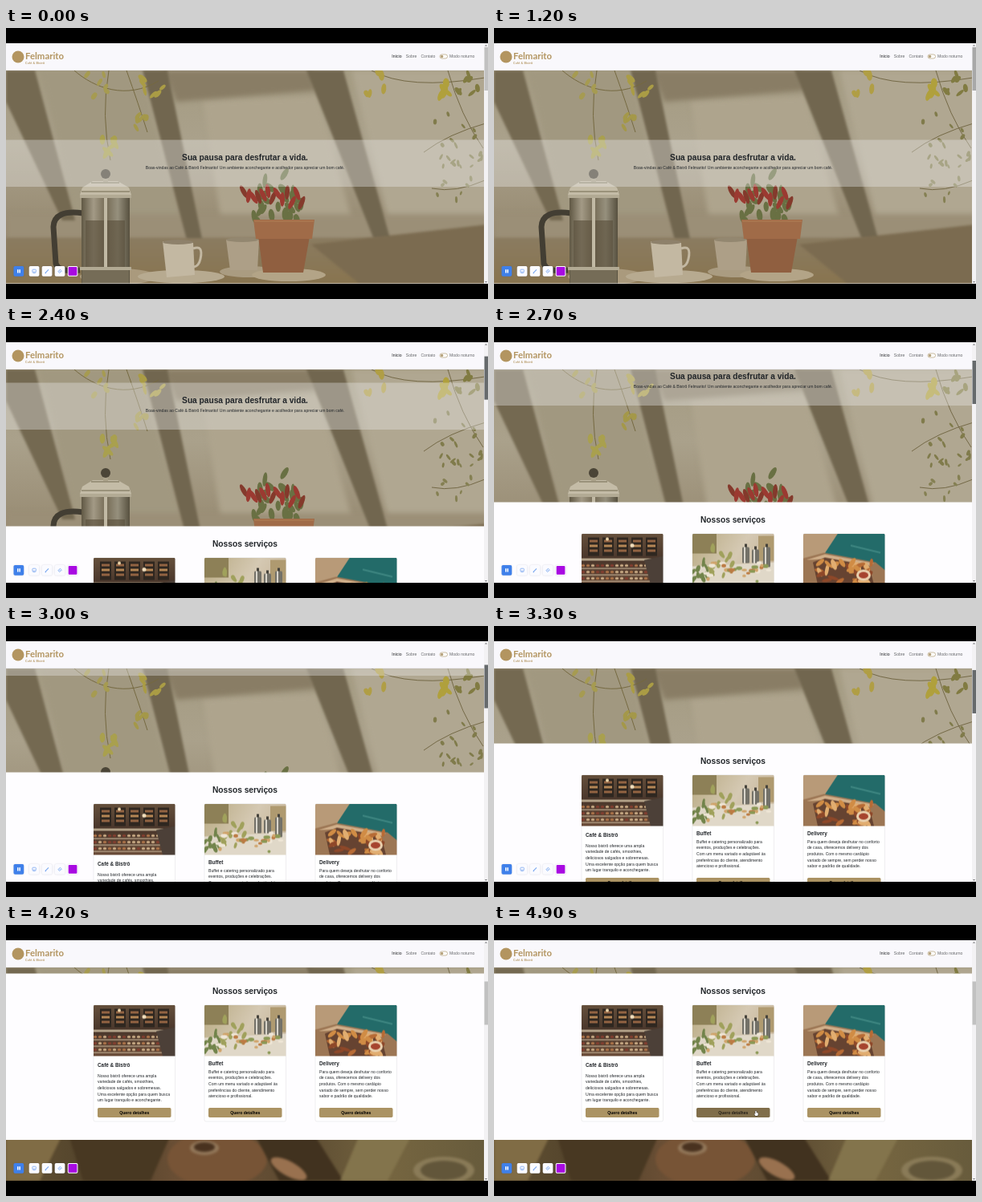
These frames come from a looping animation (600x338 px, 5000 ms). An HTML page with a canvas:

```html
<!DOCTYPE html>
<html lang="pt-BR">
<head>
<meta charset="utf-8">
<title>Café &amp; Bistrô Felmarito</title>
<style>
html, body { margin: 0; width: 100%; height: 100%; overflow: hidden; background: #000; }
canvas { display: block; width: 600px; height: 338px; }
</style>
</head>
<body>
<canvas id="stage"></canvas>
<script>
const W = 600, H = 338, LOOP = 5000, STEP = 100;
const VIEW = { top: 19, nav: 53, bottom: 319, right: 595 };
const SANS = '"Liberation Sans", Arial, sans-serif';
const LATO = 'Lato, sans-serif';
const dpr = window.devicePixelRatio || 1;
const GOLD = '#b39560';

function makeCanvas(w, h, el = document.createElement('canvas')) {
  el.width = w * dpr;
  el.height = h * dpr;
  const c = el.getContext('2d');
  c.scale(dpr, dpr);
  return c;
}
let g = makeCanvas(W, H, document.getElementById('stage'));

// Drawing helpers; all of them paint on the current context g
function rect(x, y, w, h, fill) { g.fillStyle = fill; g.fillRect(x, y, w, h); }
function round(x, y, w, h, r, fill, stroke, lw = .5) {
  g.beginPath();
  g.roundRect(x, y, w, h, r);
  if (fill) { g.fillStyle = fill; g.fill(); }
  if (stroke) { g.strokeStyle = stroke; g.lineWidth = lw; g.stroke(); }
}
function oval(x, y, rx, ry, fill, turn = 0) {
  g.beginPath();
  g.ellipse(x, y, rx, ry, turn, 0, 7);
  g.fillStyle = fill;
  g.fill();
}
function poly(fill, ...p) {
  g.beginPath();
  for (let i = 0; i < p.length; i += 2) g.lineTo(p[i], p[i + 1]);
  g.closePath();
  g.fillStyle = fill;
  g.fill();
}
function line(color, width, d) {
  g.strokeStyle = color;
  g.lineWidth = width;
  g.stroke(new Path2D(d));
}
function text(str, x, y, size, { color = '#212529', bold = false, align = 'left', font = SANS } = {}) {
  g.font = `${bold ? 'bold ' : ''}${size}px ${font}`;
  g.fillStyle = color;
  g.textAlign = align;
  g.fillText(str, x, y);
}
function blend(x0, y0, x1, y1, ...colors) {
  const f = g.createLinearGradient(x0, y0, x1, y1);
  colors.forEach((c, i) => f.addColorStop(i / (colors.length - 1), c));
  return f;
}
function seeded(seed) {
  return () => (seed = (seed * 16807) % 2147483647) / 2147483647;
}
function clipped(x, y, w, h, draw) {
  g.save();
  g.beginPath();
  g.rect(x, y, w, h);
  g.clip();
  draw();
  g.restore();
}
function prerender(w, h, draw) {
  const main = g;
  g = makeCanvas(w, h);
  draw();
  const made = g.canvas;
  g = main;
  return made;
}
function leaves(x, y, spread, count, color, size, seed) {
  const rnd = seeded(seed);
  for (let i = 0; i < count; i++) {
    oval(x + (rnd() - .5) * spread, y + (rnd() - .5) * spread * 1.3,
      size * (.5 + rnd() * .4), size * (1.1 + rnd() * .7), color, rnd() * 2 - 1);
  }
}

function paintHero() {
  rect(0, 0, W, H, blend(0, 53, 0, 319, '#a49b82', '#aaa18b', '#9b8f77', '#85745a'));
  g.filter = 'blur(3px)';
  poly('#aea48d', 245, 90, 388, 85, 435, 255, 270, 255);
  poly('#b0a791', 430, 53, 600, 53, 600, 240, 476, 240);
  poly('#a19880', 42, 53, 168, 53, 222, 250, 88, 250);
  poly('#897d65', 196, 53, 380, 53, 386, 78, 212, 92);
  rect(0, 232, 600, 30, '#9b8f77');
  g.filter = 'blur(1.5px)';
  poly('#746951', 0, 53, 36, 53, 86, 240, 70, 240, 0, 92);
  poly('#71664f', 170, 53, 201, 53, 245, 268, 226, 268);
  poly('#71664f', 374, 53, 420, 53, 479, 266, 459, 266);
  rect(0, 262, 600, 60, blend(0, 262, 0, 319, '#8a7b60', '#88744f'));
  poly('#7b6b50', 380, 270, 600, 245, 600, 319, 440, 319);
  g.filter = 'blur(.7px)';
  line('#756940', 1, 'M85 53 C110 75 150 90 190 66 M150 53 Q165 95 176 130 M128 53 Q118 110 130 165');
  line('#6e623f', .9, 'M455 53 Q500 78 596 62 M550 53 Q566 110 594 150 M600 118 Q550 132 520 155 M530 200 Q560 206 596 190');
  leaves(183, 72, 26, 6, '#aa9c45', 4, 17);
  leaves(128, 148, 16, 6, '#a9a04e', 5, 31);
  leaves(172, 112, 20, 5, '#a49849', 4, 53);
  leaves(120, 66, 38, 7, '#a69b51', 3.4, 71);
  leaves(460, 70, 22, 5, '#b09e45', 4, 83);
  leaves(550, 78, 18, 5, '#b0a03c', 5, 97);
  leaves(578, 75, 30, 9, '#817b42', 3.5, 111);
  leaves(564, 142, 60, 18, '#807b4b', 2.5, 123);
  leaves(560, 202, 46, 9, '#858053', 2.3, 149);

  // French press
  oval(140, 310, 48, 10, '#aa9a7d');
  line('#433e33', 7, 'M96 231 Q60 226 59 248 L62 294 Q66 305 92 302');
  rect(94, 204, 60, 115, blend(94, 0, 154, 0, '#605844', '#a39a86', '#756b55', '#96907d', '#57503f'));
  rect(99, 240, 49, 59, '#5c523eaa');
  rect(122, 207, 4, 98, '#c1b9a4');
  for (const y of [208, 298]) rect(92, y, 64, 4, '#b2aa94');
  rect(95, 302, 58, 17, '#756c57');
  poly('#c4bca7', 92, 208, 95, 199, 108, 191, 139, 191, 153, 199, 156, 208);
  line('#71684f', 1, 'M94 204 H154 M106 193 H141');
  rect(121, 186, 6, 6, '#aaa189');
  oval(124, 182, 6, 6, '#4b4537');

  // Cups and saucers
  oval(218, 310, 54, 8, '#b7aa90');
  poly('#c3b8a2', 195, 266, 233, 268, 235, 308, 200, 311);
  line('#c3b8a2', 3, 'M233 275 Q246 270 242 288 Q240 297 234 298');
  oval(214, 267, 19, 3, '#8e816b');
  oval(302, 304, 36, 7, '#aa9c81');
  poly('#ad9f87', 274, 264, 315, 264, 313, 302, 279, 302);
  oval(294, 264, 20, 3, '#938770');
  oval(352, 308, 46, 8, '#b3a487');

  // Pepper plant
  leaves(338, 216, 58, 32, '#697043', 5, 211);
  poly('#905f40', 314, 260, 378, 260, 370, 305, 320, 305);
  poly('#a06b48', 308, 239, 384, 239, 381, 263, 311, 263);
  line('#ad7950', 1.5, 'M309 241 H383');
  const rnd = seeded(457);
  for (let i = 0; i < 13; i++) {
    oval(296 + i * 6, 207 + Math.abs(i - 6) * 1.2 + (rnd() - .5) * 20, 3, 9,
      i % 3 ? '#9b3a31' : '#843a2c', (rnd() - .5) * 1.3);
  }
  g.filter = 'none';
}

function paintTable() {
  rect(0, 0, W, H, blend(0, 0, 600, 0, '#645334', '#50412a', '#725338', '#5b4a31', '#756540', '#675b3c'));
  g.filter = 'blur(1.5px)';
  poly('#806c45', 0, 262, 70, 262, 42, 319, 0, 319);
  poly('#483822', 78, 262, 205, 262, 180, 319, 96, 319);
  oval(263, 292, 62, 34, '#775436');
  oval(247, 278, 18, 9, '#93785a');
  oval(247, 277, 13, 6, '#49321f');
  poly('#41321f', 310, 262, 384, 262, 420, 319, 340, 319);
  oval(352, 304, 25, 9, '#99714f', .5);
  poly('#83744c', 440, 262, 505, 262, 475, 319, 416, 319);
  oval(545, 306, 38, 17, '#8a7b58');
  oval(545, 306, 29, 12, '#62563a');
  g.filter = 'none';
}

const CW = 102, CH = 64;
function paintBakery() {
  rect(0, 0, CW, CH, blend(0, 0, 0, CH, '#65503c', '#49362b', '#6a4c38'));
  g.filter = 'blur(.4px)';
  for (let i = 0; i < 5; i++) {
    rect(8 + i * 18, 5, 14, 23, '#2f2720');
    for (let j = 0; j < 3; j++) rect(10 + i * 18, 8 + j * 6, 10, 3, j % 2 ? '#b48655' : '#926342');
  }
  rect(0, 31, CW, 3, '#b1a087');
  const rnd = seeded(39);
  for (let row = 0; row < 3; row++) {
    rect(0, 43 + row * 8, CW, 1.3, '#b9a58b');
    for (let i = 0; i < 18; i++) {
      oval(2 + i * 6, 40 + row * 8, 2.2, 1.5, ['#b3774b', '#d0b18a', '#863e30'][Math.floor(rnd() * 3)]);
    }
  }
  poly('#4c4038', 78, 33, 102, 28, 102, 64, 86, 64);
  oval(63, 15, 2.5, 2.5, '#f2dfbd');
  oval(32, 7, 2, 2, '#eed7ac');
  g.filter = 'none';
}
function paintBuffet() {
  rect(0, 0, CW, CH, blend(0, 0, CW, CH, '#b8aa82', '#d5c9b3', '#c1ad90'));
  g.filter = 'blur(.4px)';
  rect(0, 0, 30, 25, '#8d8057');
  rect(82, 3, 20, 31, '#af9a70');
  poly('#e0d8c8', 0, 41, 102, 36, 102, 64, 0, 64);
  leaves(8, 47, 22, 14, '#72844b', 3, 9);
  leaves(36, 35, 27, 14, '#a0a15c', 3, 21);
  for (const [x, y, h] of [[62, 17, 20], [74, 20, 17], [88, 17, 25]]) {
    round(x, y, 9, h, 1.5, '#737168');
    rect(x + 2, y, 2, h, '#d9d5cb');
    rect(x + 3, y - 4, 3, 4, '#46433c');
  }
  const rnd = seeded(88);
  for (let i = 0; i < 28; i++) {
    oval(17 + rnd() * 78, 36 + rnd() * 24, 2 + rnd() * 3, 1.5 + rnd(),
      ['#efe6d6', '#bc7b43', '#8b9956', '#d0a46b'][i % 4]);
  }
  g.filter = 'none';
}
function paintDelivery() {
  rect(0, 0, CW, CH, '#236b69');
  g.filter = 'blur(.4px)';
  poly('#b89a78', 0, 0, 43, 0, 24, 29, 0, 32);
  poly('#9c7654', 0, 31, 26, 24, 90, 36, 102, 46, 102, 64, 0, 64);
  poly('#d0af8a', 4, 33, 27, 26, 88, 37, 80, 42, 25, 32);
  poly('#664331', 12, 36, 27, 30, 82, 40, 88, 64, 18, 64);
  const rnd = seeded(64);
  for (let i = 0; i < 34; i++) {
    oval(20 + rnd() * 66, 36 + rnd() * 25, 5 + rnd() * 3, 2 + rnd() * 1.4,
      ['#b76b35', '#d08c45', '#8e4829', '#e1ad70'][i % 4], rnd() * 3);
  }
  oval(75, 52, 9, 7, '#ead1ae');
  oval(75, 52, 6, 4, '#a6442e');
  line('#3f8782', 2, 'M59 15 L96 24');
  g.filter = 'none';
}

const hero = prerender(W, H, paintHero);
const table = prerender(W, H, paintTable);

const cards = [
  { x: 109, drop: 2.5, bodyDrop: 5, title: 'Café & Bistrô', paint: paintBakery, body: [
    'Nosso bistrô oferece uma ampla', 'variedade de cafés, smoothies,',
    'deliciosos salgados e sobremesas.', 'Uma excelente opção para quem busca',
    'um lugar tranquilo e aconchegante.'].slice(0) },
  { x: 247, drop: 0, bodyDrop: 0, title: 'Buffet', paint: paintBuffet, body: [
    'Buffet e catering personalizado para', 'eventos, produções e celebrações.',
    'Com um menu variado e adaptável às', 'preferências do cliente, atendimento',
    'atencioso e profissional.'] },
  { x: 385, drop: 0, bodyDrop: 0, title: 'Delivery', paint: paintDelivery, body: [
    'Para quem deseja desfrutar no conforto', 'de casa, oferecemos delivery dos',
    'produtos. Com o mesmo cardápio', 'variado de sempre, sem perder nosso',
    'sabor e padrão de qualidade.'] }
];
for (const c of cards) c.photo = prerender(CW, CH, c.paint);

// Motion
const scrollKeys = [[1700, 0], [2100, 40], [2700, 100], [3300, 172], [3800, 228], [4200, 258]];
const RELEASE = 4200, ARRIVE = 4700;
function scrollAt(t) {
  if (t <= scrollKeys[0][0]) return 0;
  for (let i = 1; i < scrollKeys.length; i++) {
    const [t0, a] = scrollKeys[i - 1], [t1, b] = scrollKeys[i];
    if (t <= t1) return a + (b - a) * (t - t0) / (t1 - t0);
  }
  return 258;
}
function pointerAt(t) {
  if (t <= RELEASE) return null;
  const k = Math.min(1, (t - RELEASE) / (ARRIVE - RELEASE));
  const e = k * k * (3 - 2 * k);
  return { x: 597 - 271 * e, y: 98 + 134 * e };
}

function drawCard(c, s, pointer) {
  const y = 357.5 - s, x = c.x, left = x + 5;
  round(x, y, 101.5, 145.5, 2, '#fff', '#dedee0');
  g.save();
  g.beginPath();
  g.roundRect(x, y, 101.5, CH, [2, 2, 0, 0]);
  g.clip();
  g.drawImage(c.photo, x, y, CW, CH);
  g.restore();
  text(c.title, left, y + 75.3 + c.drop, 6.38, { bold: true });
  c.body.forEach((row, i) => text(row, left, y + 85.2 + c.bodyDrop + i * 7.65, 5.1));
  const by = y + 128.5;
  const over = pointer && pointer.x > left && pointer.x < left + 91 && pointer.y > by && pointer.y < by + 12;
  round(left, by, 91.5, 12, 1.7, over ? '#806e4a' : '#ab9363');
  text('Quero detalhes', x + 50.8, by + 7.8, 5.1, { bold: true, align: 'center', color: over ? '#252018' : '#000' });
  return over;
}

function drawPage(s, pointer) {
  let over = false;
  clipped(0, VIEW.nav, VIEW.right, VIEW.bottom - VIEW.nav, () => {
    rect(0, VIEW.nav, W, H, '#fefdff');
    clipped(0, VIEW.nav, W, Math.max(0, 318.5 - s - VIEW.nav), () => {
      g.drawImage(hero, 0, 0, W, H);
      rect(0, 139.5 - s, W, 58.5, 'rgba(235,235,235,.36)');
      text('Sua pausa para desfrutar a vida.', 297.5, 164.7 - s, 10.2, { bold: true, align: 'center' });
      text('Boas-vindas ao Café & Bistrô Felmarito! Um ambiente aconchegante e acolhedor para apreciar um bom café.',
        297.5, 175.7 - s, 5.1, { align: 'center' });
    });
    text('Nossos serviços', 297.5, 343.8 - s, 10.2, { bold: true, align: 'center' });
    for (const c of cards) over = drawCard(c, s, pointer) || over;
    clipped(0, 526 - s, W, H, () => g.drawImage(table, 0, 0, W, H));
  });
  return over;
}

function drawNav() {
  rect(0, VIEW.top, VIEW.right, VIEW.nav - VIEW.top, '#f9f8fc');
  rect(0, VIEW.nav - .5, VIEW.right, .5, '#dddbdf');
  oval(15, 36, 7.5, 7.5, GOLD);
  text('Felmarito', 24, 39.3, 11.4, { bold: true, color: GOLD, font: LATO });
  g.letterSpacing = '.2px';
  text('Café & Bistrô', 24, 44.6, 3.7, { bold: true, color: GOLD, font: LATO });
  g.letterSpacing = '0px';
  const grey = { color: '#66686b' };
  text('Início', 480.3, 37.2, 5.1, { color: '#17191c' });
  text('Sobre', 497.8, 37.2, 5.1, grey);
  text('Contato', 516.4, 37.2, 5.1, grey);
  text('Modo noturno', 552, 37.2, 5.1, grey);
  round(540, 33, 9.5, 5, 2.5, '#fff', '#b5a17a', .7);
  oval(542.6, 35.5, 1.7, 1.7, '#b5a17a');
}

function drawScrollbar(s, t) {
  rect(VIEW.right, VIEW.top, 5, VIEW.bottom - VIEW.top, '#f3f2f4');
  poly('#77777a', 596, 22.5, 597.5, 20.8, 599, 22.5);
  poly('#77777a', 596, 316, 597.5, 317.7, 599, 316);
  const held = t >= 1600 && t < RELEASE, near = t >= 1000 && t < 1600;
  rect(595.5, 24 + s * .18, 4.5, 54, held ? '#666a6c' : near ? '#a8a8a8' : '#c1c1c1');
}

function drawToolbar() {
  g.save();
  g.shadowColor = 'rgba(60,70,110,.22)';
  g.shadowBlur = 2 * dpr;
  round(9.5, 297, 12.7, 12.7, 1.8, '#3f80ea');
  for (const x of [28.7, 44.7, 60.7]) round(x, 297, 12.7, 12.7, 1.8, '#fbfbff');
  round(76.7, 297, 12.7, 12.7, 1.8, '#fff');
  g.restore();
  round(77.7, 298, 10.7, 10.7, 1, '#a80ae2');
  rect(14, 301.2, 1.5, 4.3, '#fff');
  rect(16.4, 301.2, 1.5, 4.3, '#fff');
  const ink = '#7ba8ef';
  round(32.8, 301.2, 4.6, 3, 1, null, ink, .8);
  line(ink, .8, 'M32.6 304.7 Q35 307 37.6 304.7');
  line(ink, 1.1, 'M49 305.4 L53 301.4 M48.6 305.8 H50');
  line(ink, .8, 'M64.8 303.8 L67.3 301.2 L69.4 303 L66.8 305.6 Z M66 302.6 L68 304.4');
}

function drawPointer({ x, y }, hand) {
  g.save();
  g.translate(x, y);
  const shape = new Path2D(hand
    ? 'M-.7 .2 Q0 -.6 .7 .2 V2 L2.7 2.5 V4.4 L2 6 H-.6 L-2 3.8 Q-1.7 3 -.7 3.7 Z'
    : 'M0 0 V5.5 L1.3 4.3 L2.2 6.2 L3 5.8 L2.2 4 H3.9 Z');
  g.strokeStyle = '#222';
  g.lineWidth = .8;
  g.stroke(shape);
  g.fillStyle = '#fff';
  g.fill(shape);
  g.restore();
}

function render(now) {
  const t = Math.floor((now % LOOP) / STEP) * STEP;
  const s = scrollAt(t), pointer = pointerAt(t);
  rect(0, 0, W, H, '#000');
  const hand = drawPage(s, pointer);
  drawNav();
  drawScrollbar(s, t);
  drawToolbar();
  if (pointer) drawPointer(pointer, hand);
  requestAnimationFrame(render);
}
requestAnimationFrame(render);
</script>
</body>
</html>
```
